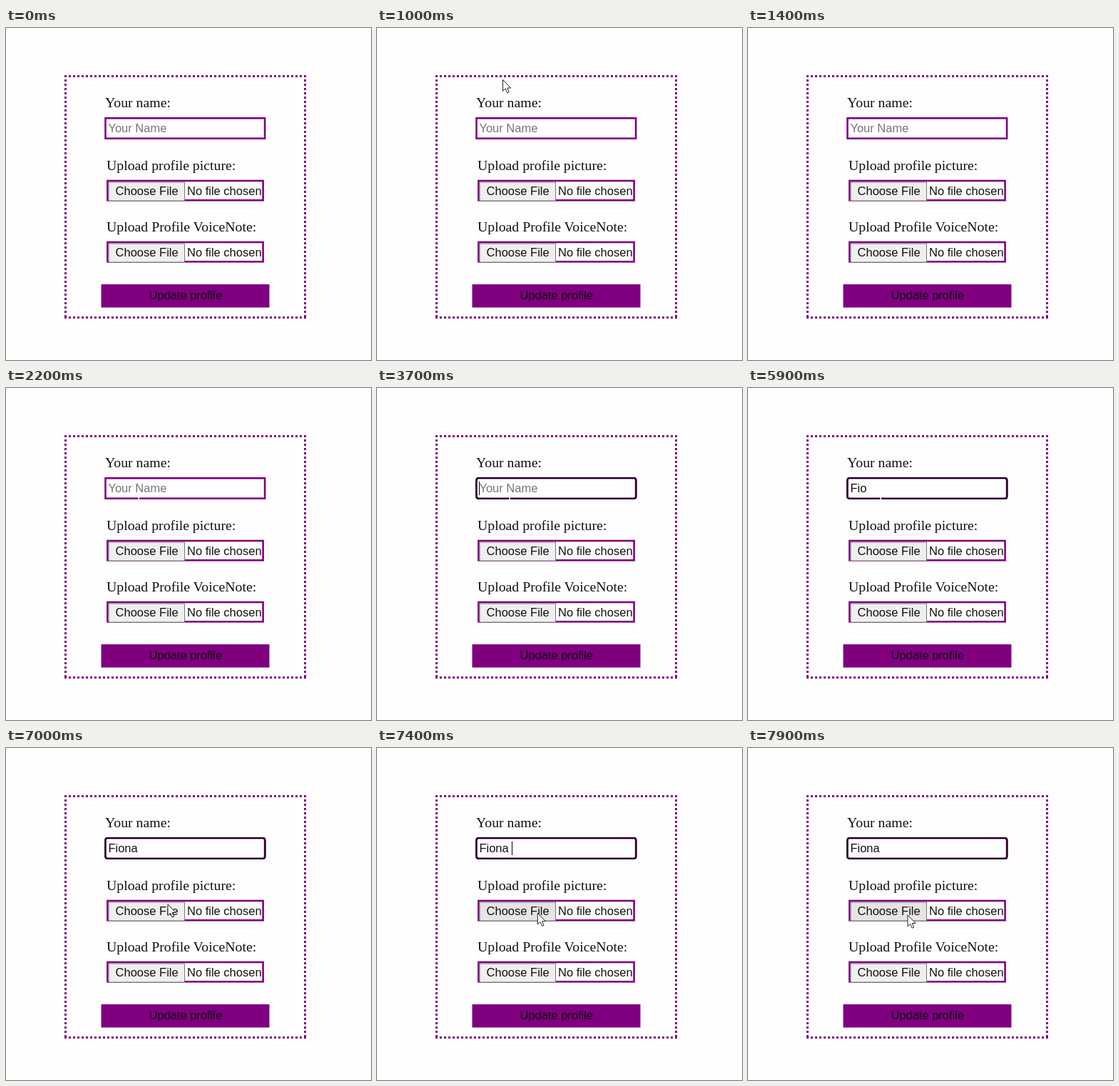
An HTML page that plays this animation: 512x465 px, repeating every 8 s.

```html
<!DOCTYPE html>
<html lang="en">
<head>
<meta charset="utf-8">
<title>Profile form</title>
<style>
  html, body { margin: 0; width: 100%; height: 100%; overflow: hidden; background: #fefefe; }
  svg { display: block; }
  text { white-space: pre; font: 16.5px "Liberation Sans", Arial, sans-serif; fill: #111; }
  .label { font: 19.8px "Liberation Serif", "Times New Roman", serif; }
  .frame { fill: #fefefe; stroke: purple; stroke-width: 2.6; }
  .dots { fill: none; stroke: purple; stroke-width: 3; stroke-dasharray: 3 3; }
  .choose { fill: #efefef; stroke: #767676; }
  .hover .choose { fill: #e5e5e5; }
  .outline { fill: none; stroke: #180018; stroke-width: 2; visibility: hidden; }
  .focus .frame { rx: 3px; }
  .focus .outline { visibility: visible; }
</style>
</head>
<body>
<svg width="512" height="465" viewBox="0 0 512 465">
  <path class="dots" d="M82 67.5H421M82 405.5H421M83.5 66V407M419.5 66V407"/>

  <text class="label" x="139" y="111">Your name:</text>
  <g id="field">
    <rect class="frame" x="139.5" y="126.3" width="223.6" height="28.4"/>
    <rect class="outline" x="139.3" y="126" width="224.2" height="29" rx="3"/>
  </g>
  <text id="hint" x="143.4" y="146" style="fill:#757575">Your Name</text>
  <text id="name" x="143.4" y="146"></text>
  <rect id="caret" y="131" width="1" height="19"/>
  <rect id="beam" x="185.3" y="153" width="1.6" height="4" fill="#fefefe"/>

  <text class="label" x="141" y="199">Upload profile picture:</text>
  <text class="label" x="141" y="285">Upload Profile VoiceNote:</text>
  <g id="picture"></g>
  <g id="voice" transform="translate(0 86)"></g>

  <rect x="133.5" y="359" width="236" height="32.5" fill="purple"/>
  <text x="200.4" y="380" style="fill:#100010">Update profile</text>

  <path id="pointer" d="M.5 .5V16.2L4.1 12.9L6.7 18.7L9.2 17.6L6.7 12H11.7Z" fill="#fefefe" stroke="#222"/>
</svg>
<script>
  const LOOP = 8000, FOCUS = 2700, LEAVE = 6900, HOVER = 7200;
  const NAME = 'Fiona ';
  const keyTimes = [4800, 5100, 5400, 6000, 6100, 6400];

  const $ = id => document.getElementById(id);
  const show = (id, on) => $(id).setAttribute('visibility', on ? 'visible' : 'hidden');
  const mix = (a, b, k) => a + (b - a) * k;
  const progress = (t, from, to) => Math.min(1, Math.max(0, (t - from) / (to - from)));

  for (const id of ['picture', 'voice']) {
    $(id).innerHTML = `
      <rect class="frame" x="142.4" y="214" width="218.2" height="27.3"/>
      <rect class="choose" x="144" y="216" width="106.5" height="26"/>
      <text x="153.6" y="234">Choose File</text>
      <text x="254" y="234">No file chosen</text>`;
  }

  // The pointer crosses into the field, then later settles on the first button.
  function pointerAt(t) {
    if (t < LEAVE) {
      const k = progress(t, 800, 1000);
      return [mix(98, 176, k), mix(8, 72, k)];
    }
    const k = progress(t, 7000, 7700);
    return [mix(226.5, 223.5, k), mix(218.5, 233.5, 1 - (1 - k) ** 2)];
  }

  function draw(t) {
    const typed = keyTimes.filter(time => time <= t).length;
    $('name').textContent = NAME.slice(0, typed);
    show('hint', !typed);

    // Each key press restarts the caret's blink.
    const since = typed ? keyTimes[typed - 1] : FOCUS;
    show('caret', t >= FOCUS && Math.floor((t - since) / 500) % 2 === 0);
    $('caret').setAttribute('x', Math.round(143 + $('name').getComputedTextLength()));
    $('field').classList.toggle('focus', t >= FOCUS);
    show('beam', t >= 1700 && t < LEAVE);

    show('pointer', t >= LEAVE || (t >= 800 && t < 1100));
    $('pointer').setAttribute('transform', `translate(${pointerAt(Math.floor(t / 100) * 100)})`);
    $('picture').classList.toggle('hover', t >= HOVER);
  }

  const start = performance.now();
  function tick() {
    draw((performance.now() - start) % LOOP);
    requestAnimationFrame(tick);
  }
  tick();
</script>
</body>
</html>
```
